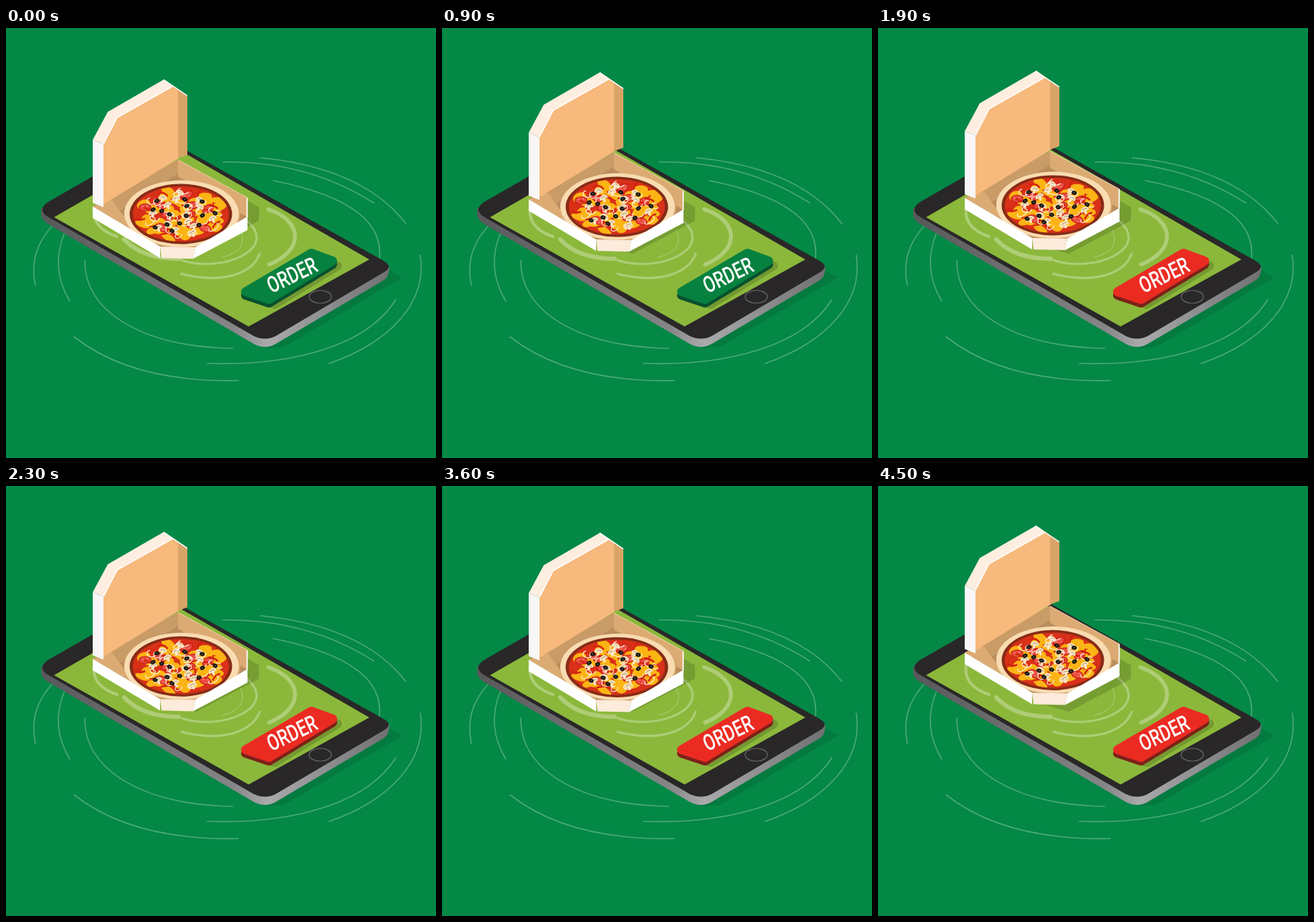
An HTML page for the animation above (4600 ms loop, 600 by 600 pixels).

```html
<!DOCTYPE html>
<html lang="en">
<head>
<meta charset="utf-8">
<title>Pizza order</title>
<style>
html, body { margin: 0; width: 100%; height: 100%; overflow: hidden; background: #038846; }
svg { display: block; width: 100%; height: 100%; }
.ripples path { fill: none; stroke: #fff; stroke-linecap: round; }
#button { --face: #07813f; --side: #09502d; }
#button.on { --face: #eb2b22; --side: #7c2118; }
.key { stroke-width: 12; stroke-linejoin: round; }
text { font: 500 24px Roboto, Arial, sans-serif; fill: #fff; text-anchor: middle; }
</style>
</head>
<body>
<svg viewBox="0 0 600 600">
  <defs>
    <linearGradient id="metal" gradientUnits="userSpaceOnUse" x1="50" x2="535">
      <stop offset="0" stop-color="#58585a"/>
      <stop offset=".55" stop-color="#858587"/>
      <stop offset=".65" stop-color="#aaaaac"/>
      <stop offset="1" stop-color="#707072"/>
    </linearGradient>
    <clipPath id="pie"><ellipse cx="244" cy="259.500" rx="67" ry="38.500"/></clipPath>
    <clipPath id="glass"><path d="M67 264 236 167 507 323 338.500 416.500Z"/></clipPath>
  </defs>

  <g class="ripples" stroke-width="1.600" opacity=".28">
    <path d="M303 187Q420 185 513 244"/>
    <path d="M355 181Q498 195 558 273"/>
    <path d="M373 213Q530 244 521 322"/>
    <path d="M41 359Q31 313 64 277"/>
    <path d="M89 381Q61 335 82 285"/>
    <path d="M110 324C108 395 190 445 316 447"/>
    <path d="M95 431C150 474 225 494 324 492"/>
    <path d="M281 468C400 472 504 443 544 379"/>
    <path d="M451 468C540 437 588 380 578 317"/>
  </g>

  <path d="M530 335 553 348 388 445 362 447Z" opacity=".1"/>
  <path d="M49 251V261Q50 268 58 273L346 441Q362 449 376 441L527 352Q535 347 535 333L362 380Z" fill="url(#metal)"/>
  <path d="M60 242 205 159Q218 152 231 159L527 325Q541 333 527 341L376 430Q362 437 346 430L56 262Q44 252 60 242Z" fill="#292728"/>
  <path d="M67 264 236 167 507 323 338.500 416.500Z" fill="#8bb83b"/>
  <ellipse cx="438.500" cy="375" rx="15.500" ry="9" fill="none" stroke="#69696b" stroke-width="1.200"/>

  <g class="ripples" opacity=".3" clip-path="url(#glass)">
    <path d="M366 253C416 270 415 311 367 330" stroke-width="5.500"/>
    <path d="M165 295Q190 322 241 322" stroke-width="6"/>
    <path d="M123 250Q119 279 155 291" stroke-width="4"/>
    <path d="M245 343C303 358 344 342 354 315" stroke-width="3.200"/>
    <path d="M245 324C300 343 385 308 334 267" stroke-width="3"/>
    <path d="M302 320Q340 310 327 282" stroke-width="1"/>
  </g>

  <path d="M240 185 353 250V269L266 315 215 300Z" opacity=".15"/>

  <g id="box">
    <path d="M121 249 240 184 337 237V264L264 307 215 305Z" fill="#b98d5c"/>
    <path d="M121 249 240 184V203L148 262Z" fill="#c99b67"/>
    <path d="M240 184 337 237V264L240 207Z" fill="#dcab73"/>
    <path d="M121 249 148 240 180 284 215 305Z" fill="#dcab73"/>
    <ellipse cx="246" cy="260" rx="81" ry="47" fill="#d5a36c"/>
    <ellipse cx="245" cy="259" rx="80" ry="46.500" fill="#f9dcb1"/>
    <ellipse cx="244" cy="259.500" rx="71.500" ry="42" fill="#872b17"/>
    <ellipse cx="244" cy="259.500" rx="67" ry="38.500" fill="#d93018"/>
    <g id="toppings" clip-path="url(#pie)"></g>
    <path d="M121 249 215 305V321L121 265Z" fill="#fff"/>
    <path d="M215 305 264 306 261 322 217 321Z" fill="#fdebdc"/>
    <path d="M264 306 337 263V282L261 322Z" fill="#fff"/>
    <path d="M336.500 237V264" stroke="#fff" stroke-width="1.800"/>
    <path d="M240 184 337 237" stroke="#f4d1a7" stroke-width="1"/>
    <path d="M121 156 142 117 220 72 253 94 240 90 155 130 136 162Z" fill="#fdeee1"/>
    <path d="M136 162 155 125 233 81 241 86V182L136 246Z" fill="#f7b97c"/>
    <path d="M233 81 253 95V177L240 182V86Z" fill="#d9a467"/>
    <path d="M220 72 253 94.500" stroke="#fff" stroke-width="1.500"/>
    <path d="M121 156 136 162V250L121 244Z" fill="#f8f6f6"/>
    <path d="M136 162 155 125 233 81" fill="none" stroke="#fff" stroke-width="1.500"/>
  </g>

  <g id="button">
    <path d="M343 374 434 320 463 332 375 386Z" class="key" opacity=".16" stroke="#000"/>
    <path d="M334 373 426 319 456 330 367 384Z" class="key" fill="var(--side)" stroke="var(--side)"/>
    <path d="M334 368 426 314 456 325 367 379Z" class="key" fill="var(--face)" stroke="var(--face)"/>
    <text y="8.500" transform="matrix(.88 -.42 .55 1.2 399 344.500)">ORDER</text>
  </g>
</svg>
<script>
const LOOP = 4600, HALF = 1500, LIFT = 16.5, PRESS = 1200;
const box = document.getElementById('box');
const button = document.getElementById('button');

let seed = 11;
const rand = (a, b) => {
  seed = (seed * 16807) % 2147483647;
  return a + (b - a) * seed / 2147483647;
};

// Scatter count toppings over the pie; reach is the share of its radius.
function scatter(count, reach, draw) {
  let out = '';
  for (let i = 0; i < count; i++) {
    const a = i * 2.4 + rand(0, .8), r = Math.sqrt((i + .5) / count) * reach;
    const x = 244 + 67 * r * Math.cos(a), y = 259 + 38 * r * Math.sin(a);
    out += `<g transform="translate(${x} ${y}) rotate(${rand(-35, 35)})">${draw()}</g>`;
  }
  return out;
}
const oval = (rx, ry, attrs) => `<ellipse rx="${rx}" ry="${ry}" ${attrs}/>`;

document.getElementById('toppings').innerHTML =
  scatter(46, .92, () => oval(rand(7, 12), rand(4, 7), 'fill="#fcb414"')) +
  scatter(10, .8, () => oval(9, 5.5, 'fill="#c9201a"') + oval(7.5, 4.3, 'fill="#ea4c40"') +
    '<path d="M-4-1h2M1 2h2M2-2h2" stroke="#f8aa96"/>') +
  scatter(16, .9, () => `<path d="M-7 2Q0 ${rand(-7, 6)} 7 0" fill="none" stroke="#d3220f" stroke-width="2.5"/>`) +
  scatter(17, .78, () => '<path d="M-6 1Q-6-5 1-5Q7-4 6 1L2 1 1 5H-2L-2 1Z" fill="#f6e5c2"/>' +
    '<path d="M-3-1Q0-4 4-1" fill="none" stroke="#b99a72"/>') +
  scatter(22, .86, () => oval(rand(5, 8), rand(3, 5),
    'fill="none" stroke="#fff0d8" stroke-width="1.2" stroke-dasharray="22 12"')) +
  scatter(15, .75, () => oval(3.6, 2.8, 'fill="#191716"') + oval(1.2, .8, 'fill="#6c5a3c"'));

function draw(now) {
  const t = Math.floor(now % LOOP / 100) * 100;
  const rise = 1 - Math.abs(t % (2 * HALF) / HALF - 1);
  box.setAttribute('transform', `translate(0 ${-LIFT * rise})`);
  button.classList.toggle('on', t >= PRESS);
  requestAnimationFrame(draw);
}
draw(0);
</script>
</body>
</html>
```
